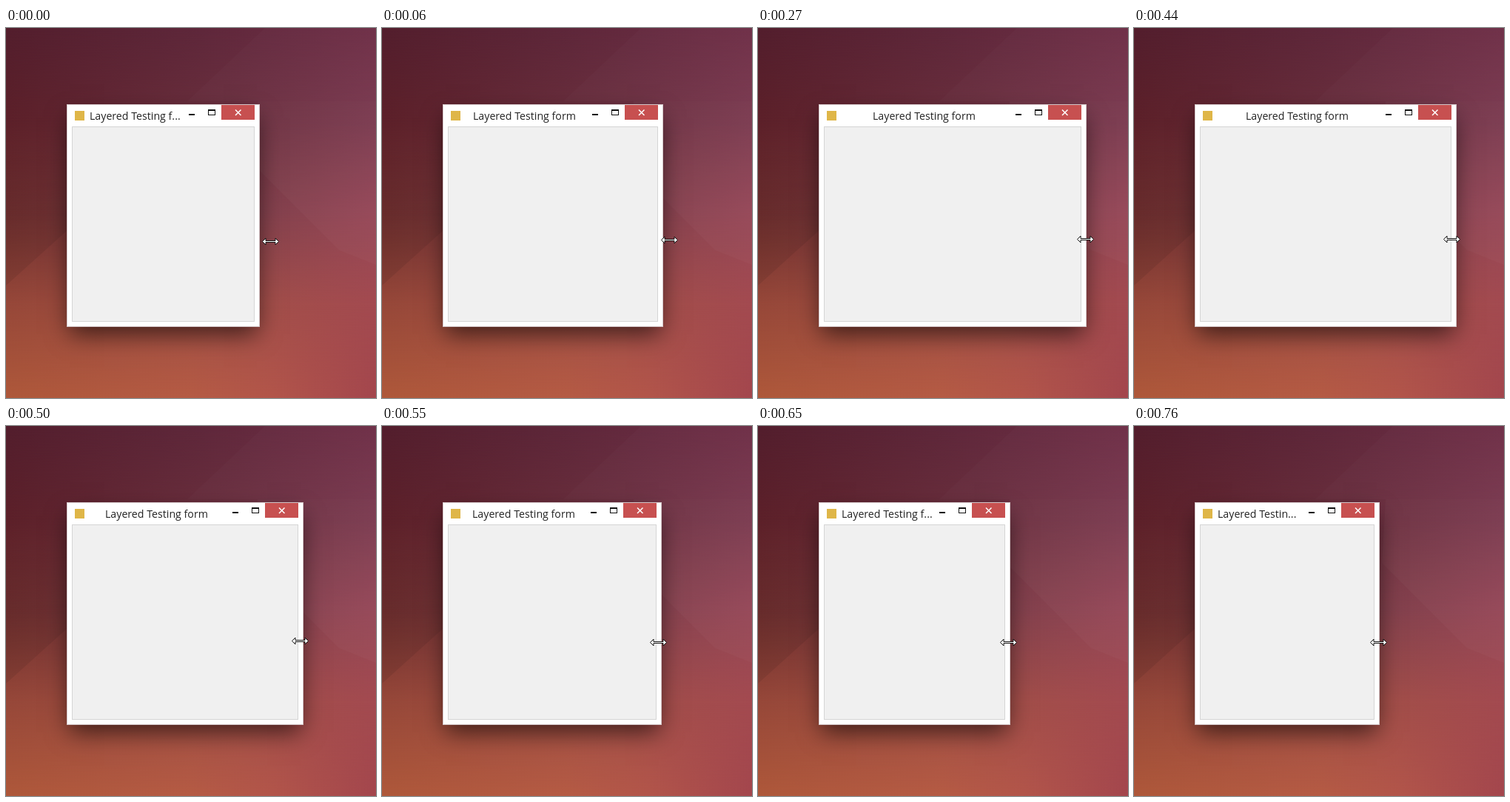
An HTML page that plays this animation: 500 px wide and 500 px high, repeating every 890 ms.

```html
<!DOCTYPE html>
<html lang="en">
<head>
<meta charset="utf-8">
<title>Window resize</title>
<style>
  html, body { margin: 0; width: 100%; height: 100%; overflow: hidden; }
  .stage { position: relative; width: 500px; height: 500px; overflow: hidden; }
  .stage > *, .window > * { position: absolute; }

  /* Wallpaper: horizontal gradients blended into each other downwards */
  .band { inset: 0; }
  .band.a { background: linear-gradient(90deg, #531e2d, #5e273a 50%, #6f2f47); }
  .band.b { background: linear-gradient(90deg, #5c2029, #6b303f 60%, #7b3a50); }
  .band.c { top: 125px; background: linear-gradient(90deg, #6d2e2e, #80404b 65%, #954757); }
  .band.d { top: 250px; background: linear-gradient(90deg, #974839, #a24f48 65%, #a34a50); }
  .band.e { top: 375px; background: linear-gradient(90deg, #ae583a, #b55b44 50%, #b2554a 72%, #a3464d); }
  .band + .band { -webkit-mask-image: linear-gradient(transparent, #000 125px); mask-image: linear-gradient(transparent, #000 125px); }

  .window {
    left: 82px; top: 103px; height: 301px;
    box-sizing: border-box;
    background: #fff;
    box-shadow: inset 0 0 0 1px #d3c6c8, 0 14px 30px -4px rgba(0, 0, 0, .6);
  }
  .client {
    inset: 30px 7px 7px;
    border: 1px solid #d5d5d5;
    background: #f0f0f0;
  }
  .icon { left: 11px; top: 9px; width: 13px; height: 13px; background: #dfb648; }
  .title {
    top: 6px;
    font: 14.2px/20px "Open Sans", "Noto Sans", sans-serif;
    color: #222;
    white-space: pre;
  }
  .buttons { right: 7px; top: 1px; }
</style>
</head>
<body>
<div class="stage">
  <div class="band a"></div>
  <div class="band b"></div>
  <div class="band c"></div>
  <div class="band d"></div>
  <div class="band e"></div>
  <svg width="500" height="500">
    <linearGradient id="shade" x2="0" y2="1">
      <stop stop-opacity="0"/>
      <stop offset=".7" stop-opacity=".08"/>
    </linearGradient>
    <path fill="#fff" fill-opacity=".015" d="M350 0 245 99H500V0Z"/>
    <path fill="#fff" fill-opacity=".025" d="M335 185 450 300 500 320V99H340Z"/>
    <path fill="url(#shade)" d="M0 150H90V267L0 348Z"/>
  </svg>

  <div class="window" id="win">
    <div class="client"></div>
    <div class="icon"></div>
    <div class="title" id="title"></div>
    <svg class="buttons" width="99" height="20">
      <path fill="#c75050" d="M54 0h45v20H54z"/>
      <path fill="none" stroke="#fff" stroke-width="1.5" d="M73 6.500l7.500 7.500m0-7.500l-7.500 7.500"/>
      <path fill="#111" d="M10 12h8v2h-8z"/>
      <path fill="#111" fill-rule="evenodd" d="M36 6h10v8H36zM37 8v5h8V8z"/>
    </svg>
  </div>

  <svg id="cursor" width="27" height="15" viewBox="-13.5 -7.5 27 15">
    <path fill="#fff" stroke="#111" d="M-11 0-6.500-4.500V-1H6.500V-4.500L11 0 6.500 4.500V1H-6.500V4.500Z"/>
  </svg>
</div>

<script>
  const LOOP = 890;
  const TEXT = "Layered Testing form";
  const PACE = [0, 60, 110, 150, 210, 270, 320]; // redraw times within a drag

  // Each drag eases from one pose to another
  const DRAGS = [
    { at: 0, span: 231, from: { width: 261, x: 357, y: 288 }, to: { width: 362, x: 442, y: 285 } },
    { at: 440, span: 260, from: { width: 354, x: 429, y: 285 }, to: { width: 250, x: 330, y: 292 } }
  ];

  const [win, title, cursor] = ["win", "title", "cursor"].map(id => document.getElementById(id));
  const mix = (a, b, p) => Math.round(a + (b - a) * p);
  const easeOut = p => 1 - (1 - Math.min(1, p)) ** 1.5;

  function setTitle(width) {
    const room = width - 136;
    title.textContent = TEXT;
    for (let n = TEXT.length - 1; n > 0 && title.getBoundingClientRect().width > room; n--)
      title.textContent = TEXT.slice(0, n) + "...";
    title.style.left = Math.max(31, Math.floor(width / 2 - 108)) + "px";
  }

  function draw(t) {
    const { at, span, from, to } = DRAGS.findLast(drag => drag.at <= t);
    const p = easeOut(PACE.findLast(tick => tick <= t - at) / span);
    const width = mix(from.width, to.width, p);
    win.style.width = width + "px";
    setTitle(width);
    // The hand drifts vertically early in the drag
    cursor.style.left = mix(from.x, to.x, p) - 13 + "px";
    cursor.style.top = mix(from.y, to.y, Math.min(1, 2 * p)) - 7 + "px";
  }

  const start = performance.now();
  function tick() {
    draw((performance.now() - start) % LOOP);
    requestAnimationFrame(tick);
  }
  tick();
</script>
</body>
</html>
```
